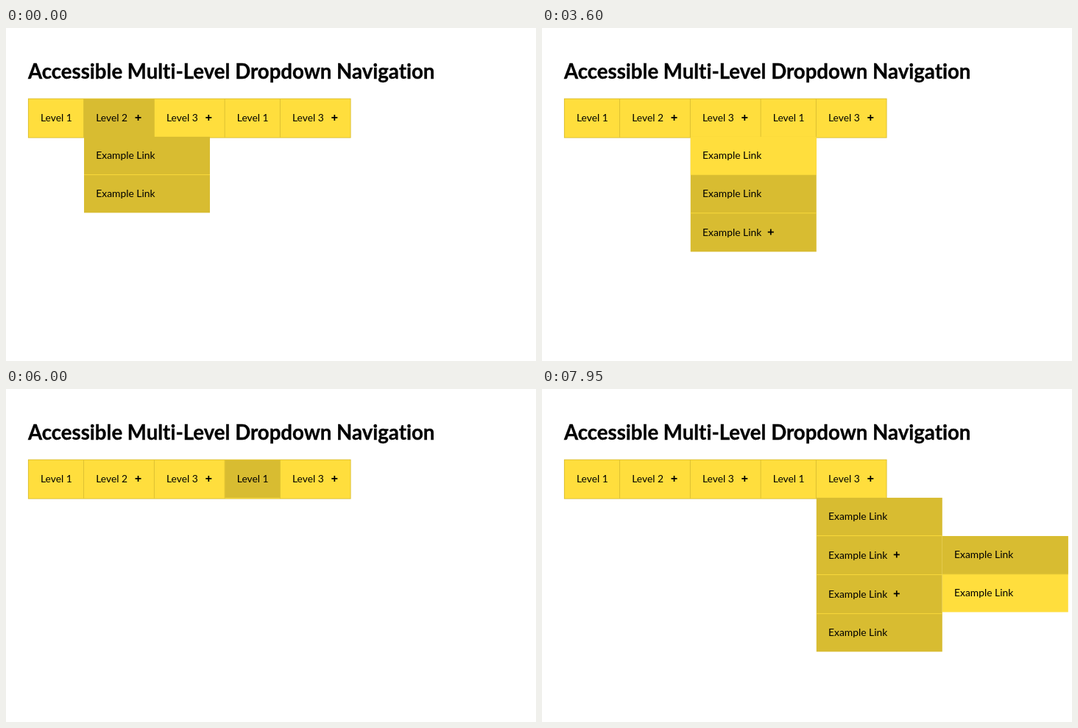
Animation of 720 by 453 pixels, one loop 8000 ms. Source, as an HTML page:

```html
<!DOCTYPE html>
<html lang="en">
<head>
<meta charset="utf-8">
<title>Accessible Multi-Level Dropdown Navigation</title>
<style>
  html, body { margin: 0; width: 100%; height: 100%; overflow: hidden; background: #fff; }
  svg { display: block; width: 720px; height: 453px; }
  text { font: 16.2px Lato, "Open Sans", sans-serif; font-variant-ligatures: none; }
  .title { font-size: 32.3px; font-weight: 700; stroke: #000; stroke-width: .4px; }
</style>
</head>
<body>
<svg viewBox="0 0 720 453">
  <g transform="scale(.855)">
    <text class="title" x="35" y="80.7">Accessible Multi-Level Dropdown Navigation</text>
    <g id="nav"></g>
  </g>
</svg>
<script>
const YELLOW = '#ffde3d', DARK = '#d8bc31';
const LOOP = 8000, ITEM_W = 200, BAR_Y = 113;

const link = items => ({ label: 'Example Link', items });
const menu = [
  { label: 'Level 1', x: 36, w: 88 },
  { label: 'Level 2', x: 124, w: 112, items: [link(), link()] },
  { label: 'Level 3', x: 236, w: 112, items: [link(), link(), link([link(), link(), link()])] },
  { label: 'Level 1', x: 348, w: 88 },
  { label: 'Level 3', x: 436, w: 112, items: [link(), link([link(), link()]), link([link(), link()]), link()] }
];

// Start time and the path of the focused entry, from the bar inwards
const steps = [
  [0, [1]], [1050, [1, 0]], [1800, [1, 1]],
  [2400, [2]], [3000, [2, 0]], [3750, [2, 1]], [4350, [2, 2]],
  [4950, [2, 2, 0]], [5400, [2, 2, 1]], [5700, [2, 2, 2]],
  [6000, [3]], [6600, [4]], [7050, [4, 0]], [7650, [4, 1]], [7950, [4, 1, 0]]
];

const rect = (x, y, w, h, fill) =>
  `<rect x="${x}" y="${y}" width="${w}" height="${h}" fill="${fill}"/>`;

const height = item => item.items ? 61 : 60;

function caption(item, x, y) {
  const base = y + height(item) - 25;
  const plusX = x + (item.label === 'Example Link' ? 127.5 : 86);
  const plus = item.items
    ? `<path d="M${plusX - 4.7} ${base - 6.4}h9.4m-4.7-4.7v9.4" stroke="#000" stroke-width="2"/>` : '';
  return `<text x="${x + 19}" y="${base}">${item.label}</text>` + plus;
}

function dropdown(items, x, top, path, depth) {
  const dark = depth % 2 === 1;
  const base = dark ? DARK : YELLOW, accent = dark ? YELLOW : DARK;
  const total = items.reduce((sum, item) => sum + height(item) + 1, -1);
  let out = rect(x, top, ITEM_W, total, base), y = top;
  items.forEach((item, i) => {
    const h = height(item), onPath = path[depth] === i;
    if (onPath && path.length === depth + 1) out += rect(x, y, ITEM_W, h, accent);
    if (i < items.length - 1) out += rect(x, y + h, ITEM_W, 1, accent);
    out += caption(item, x, y);
    if (onPath && item.items) out += dropdown(item.items, x + ITEM_W, y, path, depth + 1);
    y += h + 1;
  });
  return out;
}

function bar(path) {
  let out = rect(35, BAR_Y - 1, 513, 63, DARK) + rect(36, BAR_Y, 511, 61, YELLOW);
  menu.forEach((item, i) => {
    if (i) out += rect(item.x - 1, BAR_Y, 1, 61, DARK);
    if (path.length === 1 && path[0] === i)
      out += rect(item.x, BAR_Y, item.w - 1, height(item), DARK);
    out += caption(item, item.x, BAR_Y);
  });
  const open = menu[path[0]];
  return open.items ? out + dropdown(open.items, open.x, BAR_Y + 60, path, 1) : out;
}

const nav = document.getElementById('nav');
let shown;
function draw(now) {
  const t = now % LOOP;
  const step = steps.filter(s => s[0] <= t).pop();
  if (step !== shown) nav.innerHTML = bar(step[1]);
  shown = step;
}

function tick() {
  draw(performance.now());
  requestAnimationFrame(tick);
}
tick();
</script>
</body>
</html>
```
